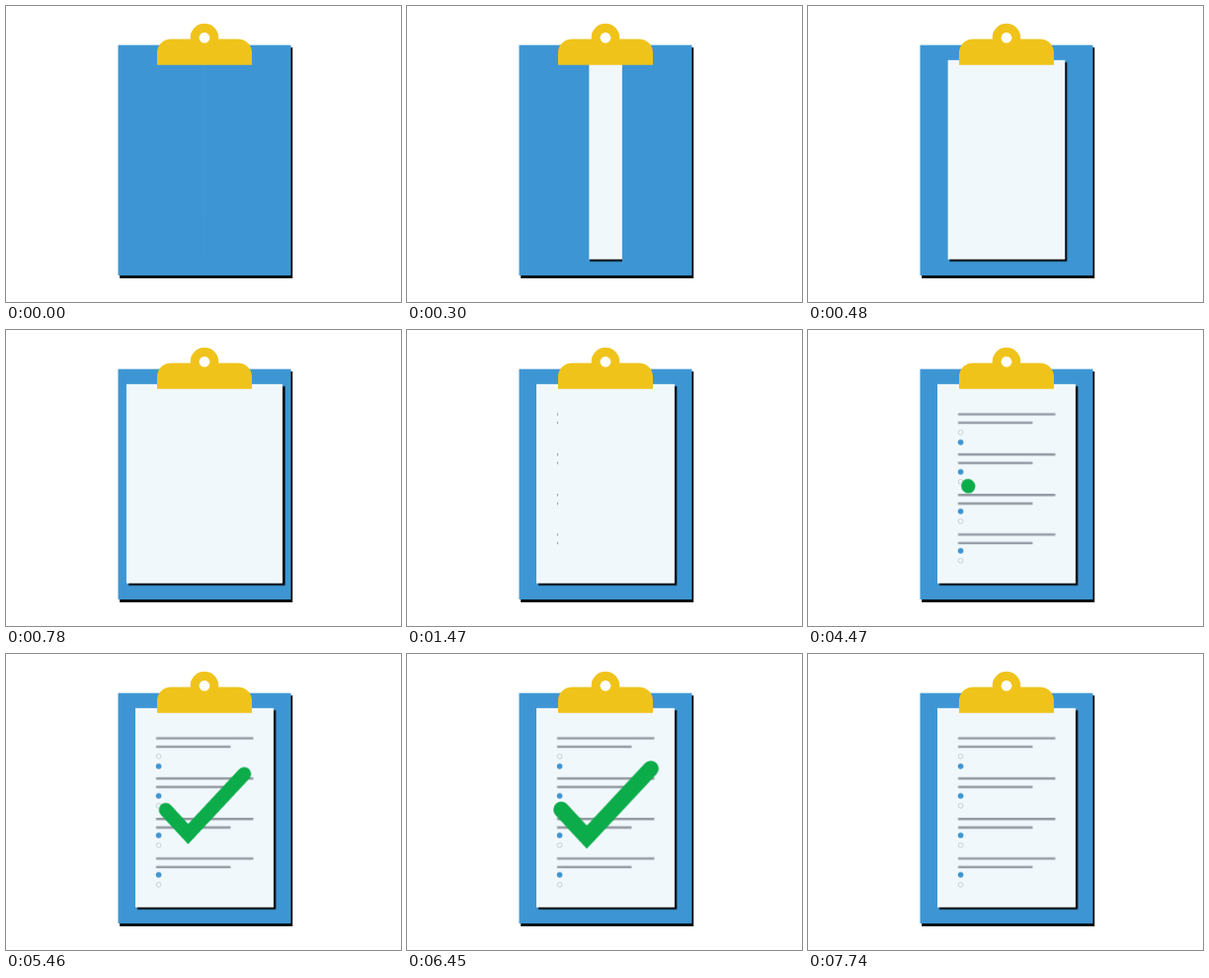
An HTML page that plays this animation: 400x300 px, repeating every 8 s.

```html
<!DOCTYPE html>
<html lang="en">
<head>
<meta charset="utf-8">
<title>Clipboard checklist</title>
<style>
  html, body { margin: 0; width: 100%; height: 100%; overflow: hidden; background: #fff; }
  svg { display: block; width: 100%; height: 100%; }

  .scene, .paper, .lines, .options, .dot, .pulse, .check {
    animation: 8s cubic-bezier(.65, 0, .35, 1) infinite both;
  }
  .scene { animation-name: blink; animation-timing-function: step-end; }
  .paper { animation-name: unfold; transform-origin: 201px 0; }
  .lines { animation-name: write; transform-origin: 152px 0; }
  .options { animation-name: appear; animation-timing-function: step-end; }
  .dot { animation-name: fill; animation-timing-function: linear; animation-delay: var(--delay, 0s); }
  .pulse { animation-name: pulse; transform-origin: 201px 160px; }
  .check { animation-name: draw, show; animation-timing-function: cubic-bezier(.65, 0, .35, 1), step-end; }

  @keyframes blink {
    0%, 76.5%, 100% { opacity: 1; }
    76.125% { opacity: 0; }
  }
  @keyframes unfold {
    0% { transform: scaleX(0); }
    10% { transform: scaleX(1.13); }
    13.75%, 100% { transform: scaleX(1); }
  }
  @keyframes write {
    0%, 18% { transform: scaleX(0); }
    21.75% { transform: scaleX(1.13); }
    24.5%, 100% { transform: scaleX(1); }
  }
  @keyframes appear {
    0% { opacity: 0; }
    31.5%, 100% { opacity: 1; }
  }
  @keyframes fill {
    0%, 31.5% { opacity: 0; }
    33.375%, 100% { opacity: 1; }
  }
  /* The second half plays the check mark backwards. */
  @keyframes draw {
    0%, 55.5%, 96.75%, 100% { stroke-dashoffset: 1; }
    60.5%, 91.75% { stroke-dashoffset: 0; }
  }
  @keyframes show {
    0%, 96.75%, 100% { opacity: 0; }
    55.6% { opacity: 1; }
  }
  @keyframes pulse {
    0%, 67.875%, 73.625%, 78.625%, 84.375%, 100% { transform: scale(1); }
    70.25%, 82% { transform: scale(1.2); }
  }
</style>
</head>
<body>
<svg viewBox="0 0 400 300">
  <defs>
    <g id="pair" fill="none" stroke="#c6cbd1" stroke-width=".9">
      <circle cx="154.6" cy="103.8" r="2.4"/>
      <circle cx="154.6" cy="113.8" r="2.4"/>
    </g>
    <circle id="mark" cx="154.6" r="2.8" fill="#3d96d3"/>
  </defs>
  <g class="scene">
    <rect x="115.2" y="42" width="175" height="234"/>
    <rect x="113.5" y="39.6" width="175" height="233.6" fill="#3d96d3"/>

    <g class="paper">
      <rect x="133" y="57" width="140.2" height="201.8"/>
      <rect x="131" y="54.8" width="140" height="202" fill="#f1f8fc"/>
    </g>

    <path fill="#f0c31a" d="M153 59.8V47.5a14 14 0 0 1 14-14h68a14 14 0 0 1 14 14v12.3z"/>
    <circle cx="201" cy="32" r="14.3" fill="#f0c31a"/>
    <circle cx="201" cy="32.2" r="5.4" fill="#fff"/>

    <path class="lines" fill="none" stroke="#959ba3" stroke-width="2.5"
      d="M152 85.4h98.4M152 94h75.4M152 126.2h98.4M152 134.8h75.4M152 167.2h98.4M152 175.8h75.4M152 207.4h98.4M152 215.9h75.4"/>

    <g class="options">
      <use href="#pair"/>
      <use href="#pair" y="40"/>
      <use href="#pair" y="80"/>
      <use href="#pair" y="120"/>
      <use class="dot" href="#mark" y="113.8"/>
      <use class="dot" href="#mark" y="143.8" style="--delay: .36s"/>
      <use class="dot" href="#mark" y="183.8" style="--delay: .69s"/>
      <use class="dot" href="#mark" y="223.8" style="--delay: 1.08s"/>
    </g>

    <g class="pulse">
      <path class="check" pathLength="1" fill="none" stroke="#0dac4b" stroke-width="14"
        stroke-linecap="round" stroke-dasharray="1 2" d="M162 158L184.5 182.3L241 121.8"/>
    </g>
  </g>
</svg>
</body>
</html>
```
